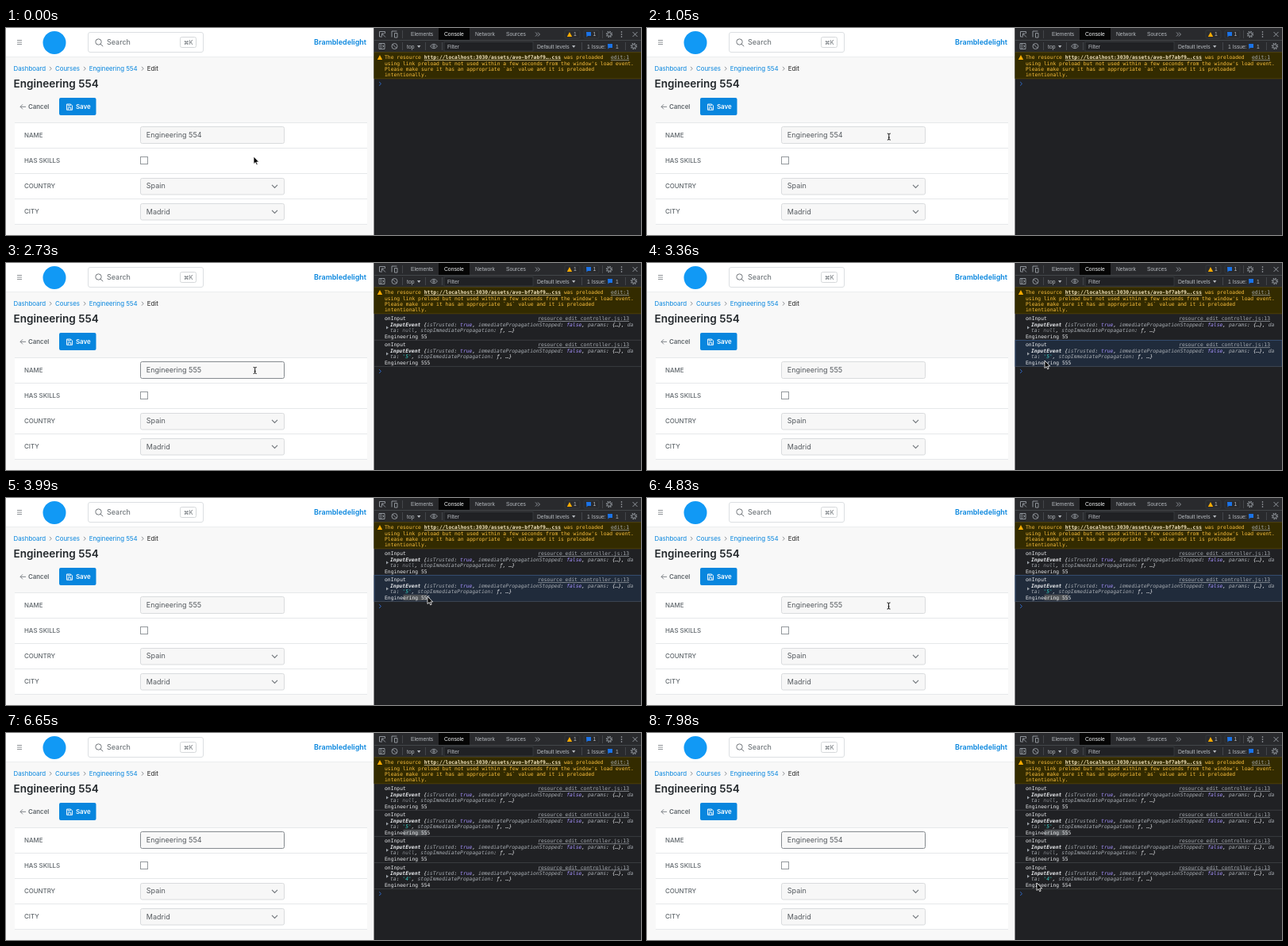
An HTML page that plays this animation: 800x261 px, repeating every 8000 ms.

```html
<!DOCTYPE html>
<html lang="en">
<head>
<meta charset="utf-8">
<title>Form input logging</title>
<style>
html, body { margin: 0; width: 100%; height: 100%; overflow: hidden; background: #fff }
svg { display: block; width: 800px; height: 261px }
text { white-space: pre }
.page { font: 9px Inter, sans-serif; fill: #5f666b }
.small { font-size: 7.875px }
.label { font-size: 7.875px; font-weight: 500 }
.bold { font-weight: 600 }
.link { fill: #0886de }
.line { fill: none; stroke: #73787d; stroke-width: 1 }
.field { fill: #f7f7f7; stroke: #d9dbdd }
.focus { fill: #f8f8f8; stroke: #858a8f }
.input { fill: #555a5f }
.tools { font: 6.75px "Liberation Sans", Arial, sans-serif; fill: #b4b8bd }
.icon { fill: none; stroke: #9aa0a6; stroke-width: .9 }
.badge { fill: #292a2d; stroke: #3c4043; stroke-width: .7 }
.bar { stroke: #4b4e52 }
.mono { font: 6.36px "DejaVu Sans Mono", monospace; fill: #e8eaed }
.warn { fill: #fabf3c }
.event { font-style: italic }
.name { fill: #a9aeb4 }
.src { fill: #a9aeb4; text-decoration: underline }
.bool { fill: #a692ff }
.null { fill: #868a8f }
.str { fill: #35d4c7 }
</style>
</head>
<body>
<svg viewBox="0 0 800 261">
  <rect width="464" height="261" fill="#f8f8f8"/>
  <rect width="464" height="36" fill="#fff"/>
  <path d="M0 36.5H464" stroke="#ebedee"/>

  <!-- page header -->
  <g class="page">
    <path class="line" d="M14 15.5h6M14 18h6M14 20.5h6" style="stroke-width:.8"/>
    <circle cx="61" cy="18.5" r="14.5" fill="#1199f5"/>
    <rect x="103.5" y="5.5" width="145" height="25" rx="2.5" fill="#fff" stroke="#dcdfe2"/>
    <g class="line"><circle cx="116.5" cy="17.5" r="3.7"/><path d="M119.2 20.2l3 3"/></g>
    <text x="127" y="21.3">Search</text>
    <rect x="219.5" y="11.5" width="20" height="13" rx="2" fill="#fff" stroke="#d5d8da"/>
    <text x="229.5" y="20.6" font-size="7" text-anchor="middle">⌘K</text>
    <text x="454" y="21.3" class="link bold" text-anchor="end">Brambledelight</text>

    <!-- breadcrumbs, title, actions -->
    <g class="small link">
      <text x="9.5" y="54">Dashboard</text>
      <text x="62" y="54">Courses</text>
      <text x="104.7" y="54">Engineering 554</text>
      <text x="177.7" y="54" fill="#222">Edit</text>
    </g>
    <path class="line" d="M55 48.8l2.2 2.4-2.2 2.4M98 48.8l2.2 2.4-2.2 2.4M171 48.8l2.2 2.4-2.2 2.4" style="stroke-width:.8"/>
    <text x="9.5" y="75.2" class="bold" font-size="13.5" fill="#22272b">Engineering 554</text>
    <path class="line" d="M25 99.3H18M21 96.3l-3 3 3 3" style="stroke-width:.9"/>
    <text x="28" y="102.2" class="small bold">Cancel</text>
    <rect x="67" y="88" width="46.5" height="22" rx="2" fill="#0886de"/>
    <path d="M76.5 96h5l2 2v5.3h-7zM78.2 96v2.2H81V96M78.2 103v-2.6h3.6v2.6" fill="none" stroke="#fff" stroke-width=".9"/>
    <text x="88" y="102.2" class="small bold" fill="#fff">Save</text>

    <!-- form -->
    <rect x="11" y="119" width="444" height="129" fill="#fff"/>
    <path d="M11 119.5H455M11 151.5H455M11 183.5H455M11 215.5H455M11 247.5H455" stroke="#e6e8ea"/>
    <g class="label">
      <text x="23" y="137.9">NAME</text>
      <text x="23" y="170">HAS SKILLS</text>
      <text x="23" y="202">COUNTRY</text>
      <text x="23" y="234.2">CITY</text>
    </g>
    <rect id="field" x="169.5" y="124.5" width="181" height="21" rx="2"/>
    <rect x="169.5" y="162.5" width="9" height="9" fill="#fff" stroke="#94999d"/>
    <g id="country">
      <rect class="field" x="169.5" y="189.5" width="181" height="20.5" rx="2"/>
      <path class="line" d="M335 197.8l3.5 3.5 3.5-3.5" style="stroke-width:1.2"/>
    </g>
    <use href="#country" y="32"/>
    <g class="input">
      <text id="value" x="176.8" y="138.3"></text>
      <text x="176.8" y="202.4">Spain</text>
      <text x="176.8" y="234.5">Madrid</text>
    </g>
  </g>

  <!-- developer tools -->
  <rect x="463.5" width="336.5" height="261" fill="#202124"/>
  <rect x="463.5" width="336.5" height="31" fill="#292a2d"/>
  <rect x="545" width="39" height="15" fill="#050505"/>
  <path class="bar" d="M464 15.5H800M499.5 3v10M499.5 18v10M528.5 18v10M549.5 18v10M725.5 18v10M780.5 18v10M751.5 3v10" stroke-width=".8"/>
  <g class="tools">
    <text x="510" y="10.4">Elements</text>
    <text x="552" y="10.4" fill="#f1f3f4">Console</text>
    <text x="591" y="10.4">Network</text>
    <text x="630" y="10.4">Sources</text>
    <text x="505" y="25.5">top</text>
    <rect x="552" y="17.5" width="112" height="11.5" fill="#202124" stroke="#3c4043" stroke-width=".7"/>
    <text x="556" y="25.5">Filter</text>
    <text x="669" y="25.5">Default levels</text>
    <text x="732" y="25.5">1 Issue:</text>
    <text x="768" y="25.5">1</text>
    <path d="M518 22h4.4l-2.2 3zM713 22h4.4l-2.2 3z"/>
    <g class="icon">
      <path d="M474 11h-3.5V4.5h7V7M473.5 7l4.5 4.5M473.5 10V7h3"/>
      <path d="M486 11.5V4h6.5M489.5 6.5h3.5v5.5h-3.5z"/>
      <path d="M667 5.5l2.5 2.5-2.5 2.5M670 5.5l2.5 2.5-2.5 2.5"/>
      <path d="M789.5 5l6 6M795.5 5l-6 6"/>
      <path d="M470 19.5h7v7h-7zM472.3 19.5v7M474 21.5l2 1.5-2 1.5"/>
      <circle cx="489.5" cy="23" r="3.5"/><path d="M487 20.5l5 5"/>
      <path d="M534.5 23q4.5-5.5 9 0q-4.5 5.5-9 0z"/><circle cx="539" cy="23" r="1.2"/>
      <g id="gear"><circle cx="760" cy="8" r="2.3"/><circle cx="760" cy="8" r="3.5" stroke-dasharray="1.37" stroke-width="1.3"/></g>
      <use href="#gear" x="31" y="15"/>
    </g>
    <circle cx="775.5" cy="5" r=".8"/><circle cx="775.5" cy="8" r=".8"/><circle cx="775.5" cy="11" r=".8"/>
    <rect class="badge" x="704" y="3" width="19" height="10" rx="1.5"/>
    <rect class="badge" x="728" y="3" width="19" height="10" rx="1.5"/>
    <path id="alert" d="M710 5l3.2 6h-6.4z" fill="#f9ab00"/>
    <path id="issue" d="M731 5h6v5h-4l-1.5 1.5z" fill="#1a73e8"/>
    <use href="#issue" x="27" y="15"/>
    <text x="715" y="10.4">1</text>
    <text x="739.5" y="10.4">1</text>
  </g>

  <!-- console -->
  <rect x="463.5" y="31" width="336.5" height="32.8" fill="#332b00"/>
  <path d="M464 30.7H800M464 63.8H800" stroke="#5c4b00" stroke-width=".7"/>
  <use href="#alert" x="-239" y="29"/>
  <g class="mono">
    <g class="warn">
      <text x="477" y="39.2">The resource <tspan text-decoration="underline" font-weight="bold" fill="#f5e6c0">http://localhost:3030/assets/avo-bf7abf9….css</tspan> was preloaded</text>
      <text x="477" y="46.5">using link preload but not used within a few seconds from the window's load event.</text>
      <text x="477" y="53.9">Please make sure it has an appropriate `as` value and it is preloaded</text>
      <text x="477" y="61.2">intentionally.</text>
    </g>
    <text x="785" y="39.2" class="src" text-anchor="end">edit:1</text>
    <g id="log"></g>
  </g>
  <path id="prompt" d="M470.2 68l2.3 2.3-2.3 2.3" fill="none" stroke="#2f6bcb"/>

  <!-- mouse -->
  <path id="arrow" d="M0 0V9.5L2.2 7.5 3.7 10.8 5.2 10.1 3.7 7H6.7Z" fill="#000" stroke="#fff" stroke-width=".8"/>
  <path id="beam" d="M-2-4Q0-4 0-3Q0-4 2-4M0-3V3M-2 4Q0 4 0 3Q0 4 2 4M-1 1H1" fill="none" stroke="#111"/>
</svg>
<script>
const LOOP = 8000, STEP = 33.1, SELECT_X = 500.5, SELECT_END = 530.5;
const $ = id => document.getElementById(id);
const span = (cls, text) => `<tspan class="${cls}">${text}</tspan>`;

// Edits in order: time, resulting value, event data
const edits = [
  [1600, "Engineering 55", null],
  [2300, "Engineering 555", "5"],
  [5700, "Engineering 55", null],
  [6300, "Engineering 554", "4"]
];
// Mouse stops: time, x, y
const stops = [
  [0, 312, 162], [700, 312, 162], [1100, 304.5, 136], [2650, 304.5, 136],
  [3270, 501, 123], [3400, 501, 123], [3850, 531, 124], [4100, 531, 124],
  [4700, 304.5, 136], [7150, 304.5, 136], [7900, 491, 189], [LOOP, 491, 189]
];
const within = (t, ...ranges) => ranges.some(([a, b]) => t >= a && t < b);

function entry([, value, data], i) {
  const shown = data ? span("str", `'${data}'`) : span("null", "null");
  const marked = i == 1;
  return `<g transform="translate(0 ${i * STEP})">
    ${marked ? '<rect id="active" x="464" y="64.5" width="336" height="32.8" fill="#202b3b" stroke="#35507a" stroke-width=".8"/>' : ""}
    <path d="M464 97.3H800" stroke="#3f4246" stroke-width=".8"/>
    ${marked ? `<rect id="selection" x="${SELECT_X}" y="88.7" height="7.4" fill="#505356"/>` : ""}
    <text x="477" y="72.3">onInput</text>
    <text x="785" y="72.3" class="src" text-anchor="end">resource_edit_controller.js:13</text>
    <path d="M479 79.5l3 2-3 2z" fill="#9aa0a6"/>
    <text x="484" y="79.7" class="event"><tspan font-weight="bold">InputEvent</tspan> {${
      span("name", "isTrusted")}: ${span("bool", "true")}, ${
      span("name", "immediatePropagationStopped")}: ${span("bool", "false")}, ${
      span("name", "params")}: {…}, ${span("name", "da")}</text>
    <text x="484" y="87.1" class="event">${span("name", "ta")}: ${shown}, ${
      span("name", "stopImmediatePropagation")}: ƒ, …}</text>
    <text x="477" y="94.5">${value}</text></g>`;
}
$("log").innerHTML = edits.map(entry).join("");
const rows = [...$("log").children];

function mouseAt(t) {
  const i = stops.findIndex(s => s[0] > t);
  const [t0, x0, y0] = stops[i - 1], [t1, x1, y1] = stops[i];
  const k = (t - t0) / (t1 - t0), e = k * k * (3 - 2 * k);
  return [x0 + (x1 - x0) * e, y0 + (y1 - y0) * e];
}
const show = (el, on) => el.setAttribute("visibility", on ? "visible" : "hidden");

function draw(now) {
  const t = now % LOOP;
  const count = edits.filter(e => t >= e[0]).length;
  rows.forEach((row, i) => row.setAttribute("display", i < count ? "inline" : "none"));
  $("prompt").setAttribute("transform", `translate(0 ${count * STEP})`);
  $("value").textContent = count ? edits[count - 1][1] : "Engineering 554";

  const focused = within(t, [1200, 3300], [5150, LOOP]);
  $("field").setAttribute("class", focused ? "focus" : "field");
  show($("active"), within(t, [3300, 5150]));

  const [x, y] = mouseAt(t);
  const end = t < 3400 ? SELECT_X : t < 3850 ? Math.min(x, SELECT_END) : SELECT_END;
  $("selection").setAttribute("width", Math.max(0, end - SELECT_X));

  const visible = !within(t, [1550, 2650], [5600, 7150]);
  const overField = x > 169 && x < 351 && y > 124 && y < 146;
  for (const id of ["arrow", "beam"]) {
    $(id).setAttribute("transform", `translate(${x} ${y})`);
    show($(id), visible && overField == (id == "beam"));
  }
  requestAnimationFrame(draw);
}
requestAnimationFrame(draw);
</script>
</body>
</html>
```
